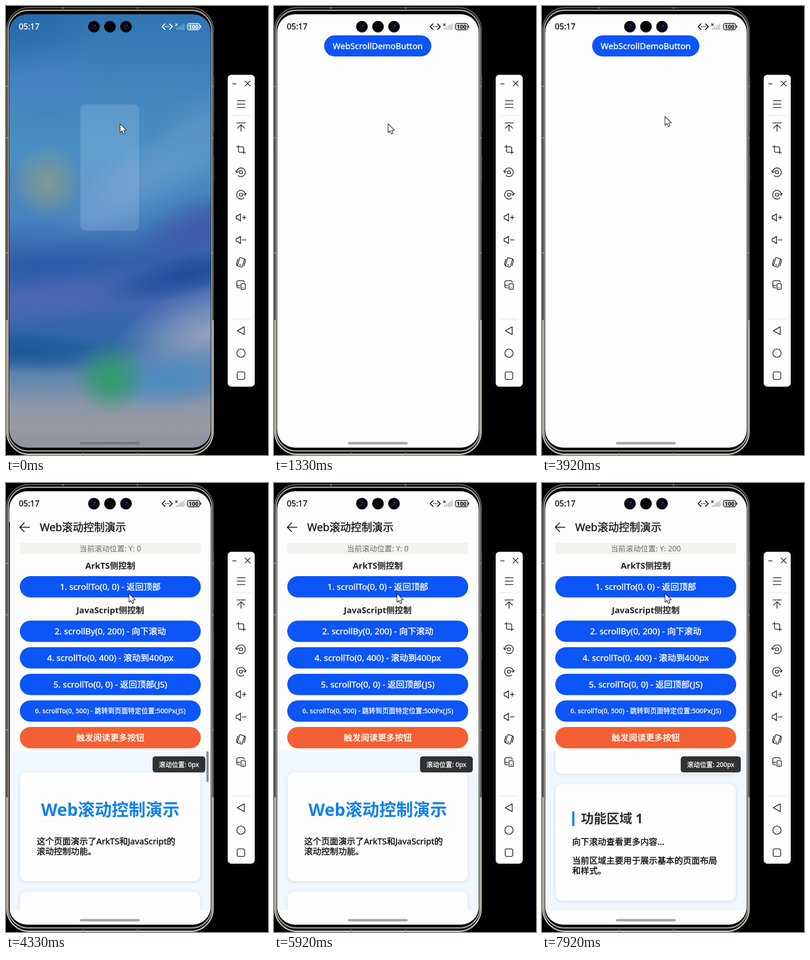
An HTML page with a canvas for the animation above (8000 ms loop, 572 px wide and 979 px high).

```html
<!DOCTYPE html>
<html lang="zh-CN">
<head>
<meta charset="utf-8">
<title>Web scroll demo</title>
<style>
html, body { margin: 0; width: 100%; height: 100%; overflow: hidden; background: #000; }
canvas { display: block; width: 572px; height: 979px; }
</style>
</head>
<body>
<canvas id="stage"></canvas>
<script>
const W = 572, H = 979, LOOP = 8000;
const FONT = '"Noto Sans", "Noto Sans CJK SC", "Noto Sans CJK", sans-serif';
const BLUE = '#0c55f7', PAGE = '#fdfdfd';
const SCREEN = { x: 7, y: 18, w: 440, h: 945, r: 39 };
const canvas = document.getElementById('stage');
const dpr = window.devicePixelRatio || 1;
canvas.width = W * dpr;
canvas.height = H * dpr;
const g = canvas.getContext('2d');

const clamp = (v, a = 0, b = 1) => Math.min(b, Math.max(a, v));
const mix = (a, b, p) => a + (b - a) * p;
const ramp = (t, a, b) => clamp((t - a) / (b - a));
const ease = p => p * p * (3 - 2 * p);

function rr(x, y, w, h, r) {
  g.beginPath();
  g.roundRect(x, y, w, h, r);
}
function box(x, y, w, h, r, fill) {
  rr(x, y, w, h, r);
  g.fillStyle = fill;
  g.fill();
}
function ring(x, y, w, h, r, color, width) {
  rr(x, y, w, h, r);
  g.strokeStyle = color;
  g.lineWidth = width;
  g.stroke();
}
function disc(x, y, r, fill) {
  g.beginPath();
  g.arc(x, y, r, 0, Math.PI * 2);
  g.fillStyle = fill;
  g.fill();
}
// Polyline strokes; several paths may be given.
function lines(...paths) {
  g.beginPath();
  for (const p of paths) {
    g.moveTo(p[0], p[1]);
    for (let i = 2; i < p.length; i += 2) g.lineTo(p[i], p[i + 1]);
  }
  g.stroke();
}
// Text centred vertically on cy; a hairline outline gives the medium weight.
function text(str, x, cy, size, color, weight = 400, align = 'left') {
  const medium = weight === 500;
  g.font = `${medium ? 400 : weight} ${size}px ${FONT}`;
  g.textAlign = align;
  g.fillStyle = color;
  g.fillText(str, x, cy + size * 0.36);
  if (!medium) return;
  g.save();
  g.strokeStyle = color;
  g.lineWidth = size * 0.026;
  g.lineJoin = 'round';
  g.strokeText(str, x, cy + size * 0.36);
  g.restore();
}
function clipTo(path, draw) {
  g.save();
  path();
  g.clip();
  draw();
  g.restore();
}

function blob(x, y, rx, ry, deg, rgb, alpha) {
  g.save();
  g.translate(x, y);
  g.rotate(deg * Math.PI / 180);
  g.scale(rx, ry);
  const f = g.createRadialGradient(0, 0, 0, 0, 0, 1);
  f.addColorStop(0, `rgba(${rgb},${alpha})`);
  f.addColorStop(0.45, `rgba(${rgb},${alpha * 0.62})`);
  f.addColorStop(1, `rgba(${rgb},0)`);
  g.fillStyle = f;
  g.fillRect(-1, -1, 2, 2);
  g.restore();
}

function wallpaper() {
  const f = g.createLinearGradient(0, 18, 0, 963);
  const stops = [[0, '#2f74b2'], [0.15, '#4084bd'], [0.32, '#4a8fc3'], [0.47, '#4682bf'],
    [0.57, '#335fa9'], [0.66, '#4368b0'], [0.77, '#2c66a6'], [0.84, '#6287ad'], [0.9, '#8b97a8'],
    [0.95, '#9799a4'], [1, '#8f939f']];
  for (const [p, c] of stops) f.addColorStop(p, c);
  g.fillStyle = f;
  g.fillRect(7, 18, 440, 945);
  blob(20, 30, 190, 130, 0, '32,98,165', 0.6);
  blob(90, 165, 120, 80, 0, '70,128,200', 0.6);
  blob(330, 360, 270, 75, -30, '112,158,208', 0.65);
  blob(440, 255, 130, 80, -20, '95,150,195', 0.55);
  blob(90, 385, 82, 82, 0, '136,155,140', 0.88);
  blob(60, 575, 230, 50, -8, '42,88,168', 0.6);
  blob(430, 480, 170, 75, -20, '62,82,165', 0.85);
  blob(400, 585, 200, 45, -14, '28,72,150', 0.85);
  blob(90, 640, 190, 55, -8, '82,106,180', 0.65);
  blob(440, 715, 220, 105, -16, '150,162,192', 0.98);
  blob(40, 752, 210, 48, 4, '25,82,150', 0.8);
  blob(350, 815, 150, 70, -5, '66,140,195', 0.8);
  blob(228, 810, 80, 82, 0, '42,158,98', 0.92);
}

function phoneFrame() {
  box(0.5, 2, 453, 976.5, 50, '#1a1916');
  ring(1.5, 3.2, 451, 974.3, 49, '#7d786e', 1.6);
  ring(4.8, 9.5, 444.4, 960.5, 44, '#b4b1aa', 2.4);
  box(6, 11, 442, 957.5, 42, '#000');
  clipTo(() => { g.beginPath(); g.rect(0, 685, 456, 294); }, () => {
    ring(2, 3.2, 450, 974.3, 49, '#c9c1b4', 2.8);
  });
  g.fillStyle = '#47433b';
  g.fillRect(453, 150, 1.5, 124);
  g.fillRect(453, 327, 1.5, 56);
  g.fillStyle = '#8b867c';
  for (const y of [174, 286, 537]) {
    g.fillRect(0, y, 4, 2.5);
    g.fillRect(450, y, 3, 2.5);
  }
  for (const x of [123, 286]) g.fillRect(x, 2, 2.5, 4);
  for (const x of [167, 286]) g.fillRect(x, 974, 2.5, 4);
}

function statusBar(dark) {
  const ink = dark ? '#111' : '#fff';
  text('05:17', 28, 45, 17.6, ink, 500);
  for (const x of [192, 227, 262]) disc(x, 45, 12.6, '#020203');
  for (const x of [192, 262]) {
    disc(x, 45, 6.2, '#0b1430');
    disc(x, 45, 4, '#050812');
    disc(x + 2, 43, 1.3, '#3d68b8');
    disc(x - 1, 47, 1, '#254888');
  }
  g.strokeStyle = ink;
  g.lineWidth = 2;
  g.lineCap = g.lineJoin = 'round';
  lines([347, 39, 341, 45, 347, 51], [357, 39, 363, 45, 357, 51]);
  for (const x of [348.3, 352, 355.7]) disc(x, 45, 1.15, ink);
  g.lineWidth = 1.7;
  lines([370, 39, 374, 43], [374, 39, 370, 43]);
  g.fillStyle = dark ? 'rgba(0,0,0,.32)' : 'rgba(255,255,255,.42)';
  for (let i = 0; i < 5; i++) {
    const h = 4 + i * 2.4;
    g.fillRect(372 + i * 3.8, 52 - h, 2, h);
  }
  box(396, 38, 27, 14, 4, dark ? 'rgba(0,0,0,.14)' : 'rgba(255,255,255,.25)');
  ring(396, 38, 27, 14, 4, ink, 1.4);
  box(424.3, 42.5, 1.8, 5, 1, ink);
  text('100', 409.5, 45, 12.5, ink, 700, 'center');
}

function appIcon(cx, cy, s, alpha) {
  g.save();
  g.globalAlpha = alpha;
  g.translate(cx, cy);
  g.scale(s / 44, s / 44);
  const f = g.createLinearGradient(0, -22, 0, 22);
  f.addColorStop(0, '#4a8cf0');
  f.addColorStop(1, '#2f66e2');
  box(-22, -22, 44, 44, 10, f);
  for (const [x, y, c] of [[-15, -15, '#eef4ff'], [1, -15, '#dbe7fd'], [-15, 1, '#dbe7fd'], [1, 1, '#9dbcf5']])
    box(x, y, 14, 14, 3, c);
  g.restore();
}

// App window growing from its launcher card to the full screen.
function launch(t) {
  const k = 8.8 * t / 1000;
  const p = t > 780 ? 1 : 1 - (1 + 0.6 * k) * Math.exp(-k);
  const w = mix(127, 440, p), h = mix(273, 945, p);
  const cx = mix(226.5, 227, p), cy = mix(351.5, 490.5, p);
  const a = clamp(0.14 + t / 485);
  box(cx - w / 2, cy - h / 2, w, h, mix(12, 40, p), `rgba(253,253,253,${a})`);
  appIcon(cx, cy, mix(10, 49, p), clamp(0.1 + t / 365));
}

function firstPage() {
  g.fillStyle = PAGE;
  g.fillRect(7, 18, 440, 945);
  box(109.5, 64, 234, 46, 23, BLUE);
  text('WebScrollDemoButton', 226.5, 87, 18.4, '#fff', 500, 'center');
}

function card(y, h) {
  g.save();
  g.shadowColor = 'rgba(0,0,0,.11)';
  g.shadowBlur = 8 * dpr;
  g.shadowOffsetY = 2 * dpr;
  box(29.5, y, 393.5, h, 14, PAGE);
  g.restore();
}

function webView(pos, barAlpha) {
  const shift = pos * 1.17, ink = '#111', accent = '#0f80f2';
  g.fillStyle = '#f0f7fe';
  g.fillRect(7, 585, 440, 346);
  clipTo(() => { g.beginPath(); g.rect(7, 585, 440, 346); }, () => {
    g.save();
    g.translate(0, -shift);
    card(631, 237);
    text('Web滚动控制演示', 226.5, 713, 37, accent, 700, 'center');
    text('这个页面演示了ArkTS和JavaScript的', 66, 781, 18.6, ink, 500);
    text('滚动控制功能。', 66, 803, 18.6, ink, 500);
    card(891, 254);
    g.fillStyle = accent;
    g.fillRect(66, 950, 4.7, 32);
    text('功能区域 1', 85, 966, 28, '#303030', 700);
    text('向下滚动查看更多内容...', 66, 1016, 18.6, ink, 500);
    text('当前区域主要用于展示基本的页面布局', 66, 1057, 18.6, ink, 500);
    text('和样式。', 66, 1079, 18.6, ink, 500);
    card(1168, 254);
    g.restore();

    const label = `滚动位置: ${Math.round(pos)}px`;
    g.font = `400 14px ${FONT}`;
    const w = g.measureText(label).width + 28;
    box(434 - w, 596, w, 35, 6, '#303133');
    text(label, 420, 613.5, 14, '#fff', 500, 'right');
    box(436.5, 585 + shift * 0.194, 4.6, 67, 2.3, `rgba(112,120,128,${0.85 * barAlpha})`);
  });
}

function demoPage(pos, barAlpha) {
  g.fillStyle = PAGE;
  g.fillRect(7, 18, 440, 945);
  g.strokeStyle = '#1c1c1c';
  g.lineWidth = 1.9;
  lines([50, 96.5, 29, 96.5], [38.5, 87, 29, 96.5, 38.5, 106]);
  text('Web滚动控制演示', 72.5, 96.5, 23.3, '#222', 500);
  g.fillStyle = '#f2f2ef';
  g.fillRect(29, 131, 395, 24);
  text(`当前滚动位置: Y: ${Math.round(pos)}`, 226.5, 143, 16.4, '#6a6a6a', 400, 'center');
  text('ArkTS侧控制', 226.5, 180, 18.5, '#222', 700, 'center');
  text('JavaScript侧控制', 226.5, 277.5, 18.5, '#222', 700, 'center');
  const buttons = [
    [203, '1. scrollTo(0, 0) - 返回顶部'],
    [300, '2. scrollBy(0, 200) - 向下滚动'],
    [358, '4. scrollTo(0, 400) - 滚动到400px'],
    [416, '5. scrollTo(0, 0) - 返回顶部(JS)'],
    [474, '6. scrollTo(0, 500) - 跳转到页面特定位置:500Px(JS)', 14.6],
    [532, '触发阅读更多按钮', 18.6, '#f45f33']
  ];
  for (const [y, label, size = 18.7, color = BLUE] of buttons) {
    box(29, y, 395, 46.5, 23.2, color);
    text(label, 226.5, y + 23, size, '#fff', 500, 'center');
  }
  webView(pos, barAlpha);
}

function screen(t) {
  const PUSH = 3925, SCROLL = 6300;
  if (t < 800) {
    wallpaper();
    launch(t);
  } else if (t < PUSH) {
    firstPage();
    const fade = 1 - ramp(t, 800, 950);
    if (fade > 0) {
      g.save();
      g.globalAlpha = fade;
      g.fillStyle = PAGE;
      g.fillRect(7, 18, 440, 945);
      g.restore();
      appIcon(227, 490.5, 49, fade);
    }
  } else {
    // Critically damped spring push.
    const k = 20 * (t - PUSH) / 1000;
    let off = 440 * (1 + k) * Math.exp(-k);
    if (off < 0.1) off = 0;
    const pos = 200 * ease(ramp(t, SCROLL, SCROLL + 300));
    const bar = t < SCROLL ? 1 - ramp(t, 5000, 5400) : 1 - ramp(t, 7150, 7500);
    if (off > 2) {
      g.save();
      g.translate((off - 440) * 0.3, 0);
      firstPage();
      g.restore();
    }
    g.fillStyle = PAGE;
    g.fillRect(7, 18, off, 67 * (off <= 2));
    g.save();
    g.translate(off, 0);
    demoPage(pos, bar);
    g.restore();
  }
  statusBar(t > 480);
  box(161.5, 950.5, 130.5, 5.5, 2.7, t < 480 ? '#74767e' : '#a7a7a9');
}

function speaker(y, plus) {
  lines([502.5, y - 3.5, 506, y - 3.5, 512, y - 8, 512, y + 8, 506, y + 3.5, 502.5, y + 3.5, 502.5, y - 3.5],
    [516, y, 524, y]);
  if (plus) lines([520, y - 4, 520, y + 4]);
}

function turn(y, dir) {
  g.save();
  g.translate(513, y);
  g.scale(dir, 1);
  g.beginPath();
  g.arc(0, 0, 9.5, -Math.PI * 0.93, Math.PI * 0.72);
  g.stroke();
  lines([-11.5, -3, -9, 1, -5.5, -2]);
  rr(-3, -3, 6, 6, 1);
  g.stroke();
  g.restore();
}

function toolbar() {
  const ink = '#1b1b1f';
  g.save();
  g.shadowColor = 'rgba(60,60,65,.25)';
  g.shadowBlur = 16 * dpr;
  box(484, 150, 59, 680, 8, '#fefefe');
  g.restore();
  g.strokeStyle = '#dcdcdc';
  g.lineWidth = 1;
  lines([494, 239, 533, 239], [494, 682.5, 533, 682.5]);
  g.strokeStyle = ink;
  g.lineWidth = 1.6;
  lines([494.5, 169.8, 502.5, 169.8], [522, 163.5, 533, 174.5], [533, 163.5, 522, 174.5],
    [504.5, 206.5, 522, 206.5], [504.5, 214, 522, 214], [504.5, 221.5, 522, 221.5],
    [504, 255, 522.5, 255], [513.2, 273, 513.2, 259.5], [505.5, 266.5, 513.2, 259, 521, 266.5],
    [503.5, 307, 517, 307, 519, 309, 519, 322.5], [507.5, 303.5, 507.5, 317, 509.5, 319, 523, 319]);
  turn(362.5, 1);
  turn(411.5, -1);
  speaker(461, true);
  speaker(510, false);

  g.save();
  g.translate(513, 559);
  g.rotate(0.28);
  rr(-5.5, -9.5, 11, 19, 2);
  g.stroke();
  lines([-1.5, 6, 1.5, 6], [-8.5, -5, -8.5, 6, -6.5, 9], [8.5, 5, 8.5, -6, 6.5, -9]);
  g.restore();

  lines([510, 614.5, 506, 614.5, 504, 612.5, 504, 601, 506, 599, 518, 599, 520, 601, 520, 602.5], [504, 609, 510, 609]);
  rr(513, 605.5, 9.5, 12.5, 2);
  g.stroke();
  lines([517, 614.5, 518.5, 614.5]);

  lines([505, 708, 520, 699.5, 520, 716.5, 505, 708]);
  g.beginPath();
  g.arc(513, 757, 9, 0, Math.PI * 2);
  g.stroke();
  rr(504.7, 797.7, 16.6, 16.6, 3.5);
  g.stroke();
}

function cursor(t) {
  const p = ease(ramp(t, 2300, 2600));
  g.save();
  g.translate(mix(249, 268.5, p), mix(257, 241, p));
  g.beginPath();
  const pts = [0, 0, 0, 19, 4.4, 15.2, 7.4, 22, 10.8, 20.5, 8, 14, 14, 13.6];
  for (let i = 0; i < pts.length; i += 2) g.lineTo(pts[i], pts[i + 1]);
  g.closePath();
  g.fillStyle = '#fff';
  g.fill();
  g.strokeStyle = '#15151c';
  g.lineWidth = 1.2;
  g.stroke();
  g.restore();
}

function draw(t) {
  g.setTransform(dpr, 0, 0, dpr, 0, 0);
  g.fillStyle = '#000';
  g.fillRect(0, 0, W, H);
  phoneFrame();
  const s = SCREEN;
  clipTo(() => rr(s.x, s.y, s.w, s.h, s.r), () => screen(t));
  g.lineCap = g.lineJoin = 'round';
  toolbar();
  cursor(t);
}

const start = performance.now();
function tick() {
  draw((performance.now() - start) % LOOP);
  requestAnimationFrame(tick);
}
tick();
</script>
</body>
</html>
```
